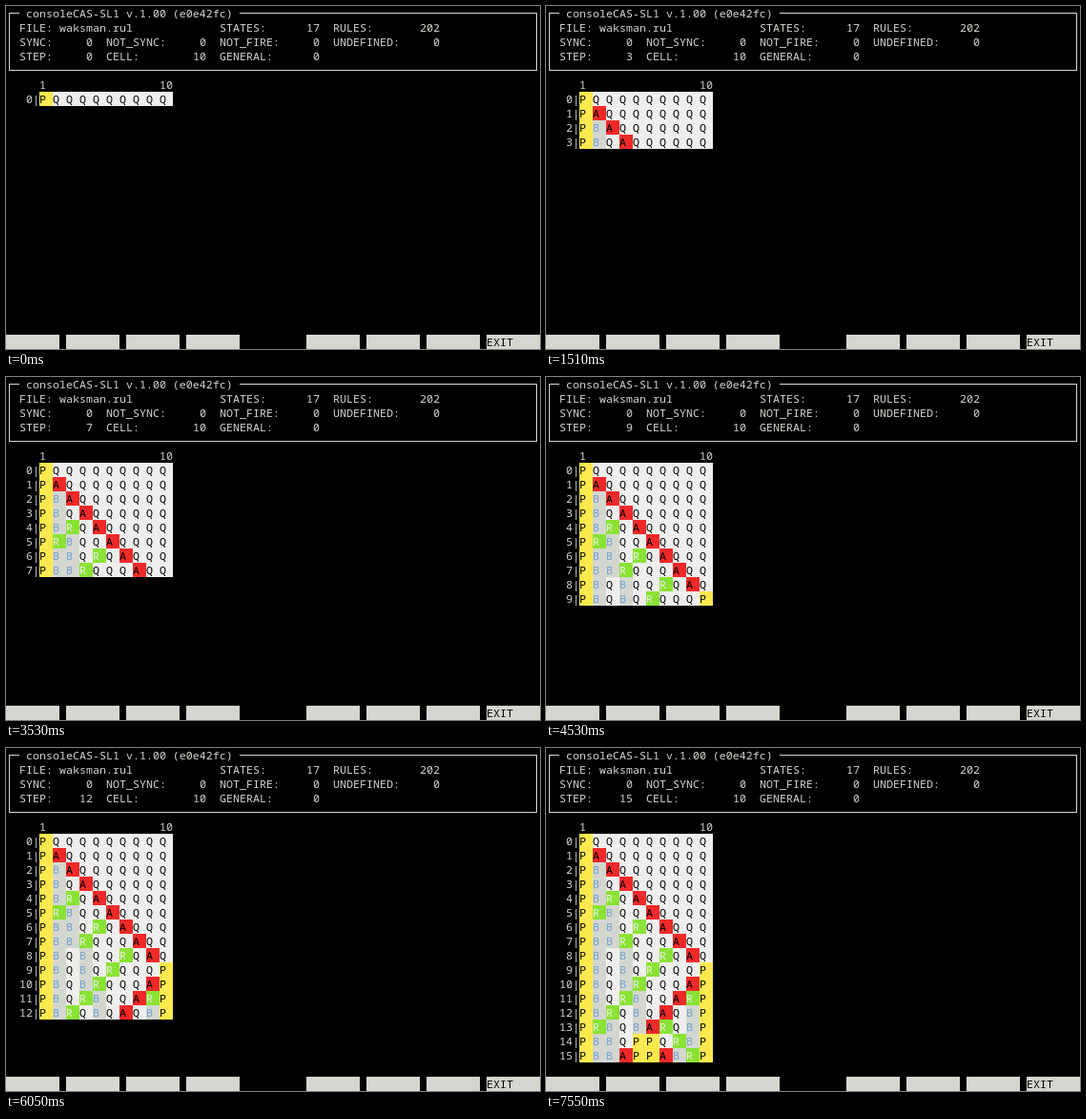
Write an HTML page with a canvas that moves like this. It is 560 px wide and 360 px high and loops after 8 s.

```html
<!DOCTYPE html>
<html>
<head>
<meta charset="utf-8">
<title>Firing squad</title>
<style>
html, body { margin: 0; width: 560px; height: 360px; background: #000; overflow: hidden; }
canvas { display: block; }
</style>
</head>
<body>
<canvas id="stage" width="560" height="360"></canvas>
<script>
const ctx = document.getElementById('stage').getContext('2d');
const W = 7, H = 15, LOOP = 8000;
const GREY = '#d3d7cf', WHITE = '#eeeeec', BLACK = '#000';

// state: [background, letter]
const STYLE = {
  P: ['#fce94f', BLACK],
  Q: [WHITE, BLACK],
  A: ['#ef2929', BLACK],
  B: [GREY, '#729fcf'],
  R: ['#8ae234', WHITE]
};
const ROWS = `PQQQQQQQQQ PAQQQQQQQQ PBAQQQQQQQ PBQAQQQQQQ
  PBRQAQQQQQ PRBQQAQQQQ PBBQRQAQQQ PBBRQQQAQQ
  PBQBQQRQAQ PBQBQRQQQP PBQBRQQQAP PBQRBQQARP
  PBRQBQAQBP PRBQBARQBP PBBQPPQRBP PBBAPPABRP`.split(/\s+/);
const TIMES = [0, 500, 1000, 1510, 2010, 2510, 3020, 3530,
  4030, 4530, 5040, 5540, 6050, 6550, 7050, 7550];

function text(col, row, s, color = GREY) {
  ctx.fillStyle = color;
  ctx.fillText(s, col * W, row * H + 12);
}

function block(col, row, cols, color) {
  ctx.fillStyle = color;
  ctx.fillRect(col * W, row * H, cols * W, H);
}

// label at one column, value right-aligned to end before another
function field(col, row, label, end, value) {
  text(col, row, label + ':');
  text(end - String(value).length, row, String(value));
}

function header(step) {
  ctx.strokeStyle = GREY;
  ctx.lineWidth = 1;
  ctx.strokeRect(3.5, 7.5, 553, 60);
  block(2, 0, 33, BLACK);
  text(3, 0, 'consoleCAS-SL1 v.1.00 (e0e42fc)');
  text(2, 1, 'FILE: waksman.rul');
  field(32, 1, 'STATES', 47, 17);
  field(49, 1, 'RULES', 65, 202);
  field(2, 2, 'SYNC', 13, 0);
  field(15, 2, 'NOT_SYNC', 30, 0);
  field(32, 2, 'NOT_FIRE', 47, 0);
  field(49, 2, 'UNDEFINED', 65, 0);
  field(2, 3, 'STEP', 13, step);
  field(15, 3, 'CELL', 30, 10);
  field(32, 3, 'GENERAL', 47, 0);
}

function cells(step) {
  text(5, 5, '1');
  text(23, 5, '10');
  ROWS.slice(0, step + 1).forEach((states, i) => {
    text(2, 6 + i, String(i).padStart(2) + '|');
    [...states].forEach((state, j) => {
      const [back, ink] = STYLE[state];
      block(5 + 2 * j, 6 + i, 2, back);
      text(5 + 2 * j, 6 + i, state, ink);
    });
  });
}

function footer() {
  for (let i = 0; i < 9; i++) if (i !== 4) block(9 * i, 23, 8, GREY);
  text(72, 23, 'EXIT', BLACK);
}

function draw(now) {
  const t = now % LOOP;
  const step = TIMES.filter(start => start <= t).length - 1;
  ctx.fillStyle = BLACK;
  ctx.fillRect(0, 0, 560, 360);
  // this size gives a 7px advance
  ctx.font = '11.667px "Noto Sans Mono", monospace';
  header(step);
  cells(step);
  footer();
}

const begin = performance.now();
function frame() {
  draw(performance.now() - begin);
  requestAnimationFrame(frame);
}
frame();
</script>
</body>
</html>
```
